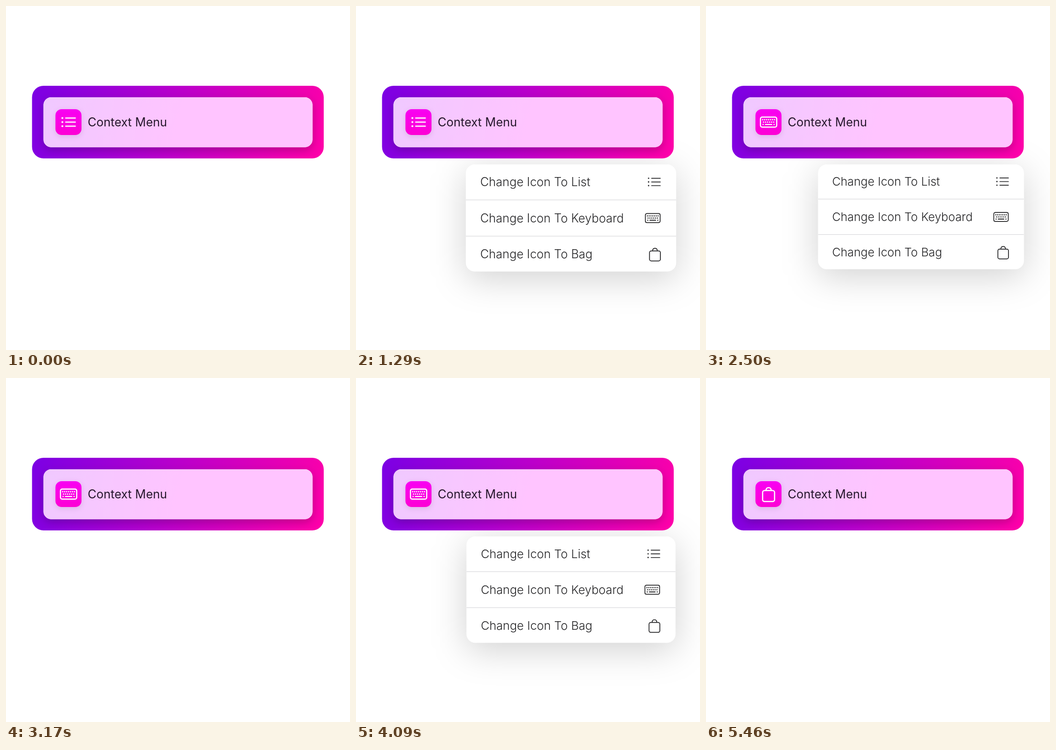
Recreate the animation shown at these times as an HTML page with a canvas. Size 720 by 720 pixels, loop 5960 ms.

```html
<!DOCTYPE html>
<html lang="en">
<head>
<meta charset="utf-8">
<title>Context menu</title>
<style>
  html, body { margin: 0; width: 100%; height: 100%; overflow: hidden; background: #fff; }
  canvas { display: block; width: 100%; height: 100%; }
</style>
</head>
<body>
<canvas id="stage" width="720" height="720"></canvas>
<script>
const ctx = document.getElementById('stage').getContext('2d');
const LOOP = 5960;
const FONT = 'Inter, Roboto, sans-serif';
const INK = '#252527';

// Stretches of motion: start, end, number of steps
const RUNS = [
  [880, 1460, 7], [1580, 2090, 6], [2290, 2880, 7],
  [3670, 4170, 6], [4300, 4880, 7], [5010, 5460, 6]
];

// Each opening of the menu: press time, opacity at the press, closing time
const OPENINGS = [
  { press: 880, dim: 0.3, close: 2510 },
  { press: 3670, dim: 0.18, close: 5110 }
];
const CLOSE_MS = 345;

// Highlighted row: from, to, row
const HIGHLIGHTS = [
  [1580, 1680, 0], [1680, 2290, 1],
  [4390, 4490, 0], [4490, 4780, 1], [4780, 5010, 2]
];

const clamp = v => Math.min(1, Math.max(0, v));

function snap(t) {
  let held = 0;
  for (const [start, end, steps] of RUNS) {
    if (t < start) break;
    const gap = (end - start) / (steps - 1);
    held = Math.min(end, start + Math.floor((t - start) / gap + 1e-6) * gap);
  }
  return held;
}

function box(x, y, w, h, r) {
  ctx.beginPath();
  ctx.roundRect(x, y, w, h, r);
}

function fillBox(x, y, w, h, r, fill, alpha = 1) {
  ctx.save();
  ctx.globalAlpha *= alpha;
  ctx.fillStyle = fill;
  box(x, y, w, h, r);
  ctx.fill();
  ctx.restore();
}

function softBox(x, y, w, h, r, blur, alpha) {
  ctx.save();
  ctx.filter = `blur(${blur}px)`;
  fillBox(x, y, w, h, r, '#000', alpha);
  ctx.restore();
}

function gradient(x0, y0, x1, y1, ...colors) {
  const g = ctx.createLinearGradient(x0, y0, x1, y1);
  colors.forEach((c, i) => g.addColorStop(i / (colors.length - 1), c));
  return g;
}

function label(text, x, y, size, weight, color) {
  ctx.font = `${weight} ${size}px ${FONT}`;
  ctx.fillStyle = color;
  ctx.fillText(text, x, y);
}

function dot(x, y, r) {
  ctx.beginPath();
  ctx.arc(x, y, r, 0, Math.PI * 2);
  ctx.fill();
}

function line(x0, x1, y) {
  ctx.beginPath();
  ctx.moveTo(x0, y);
  ctx.lineTo(x1, y);
  ctx.stroke();
}

function listIcon() {
  for (const y of [-8.5, 0, 8.5]) {
    dot(-13, y, ctx.lineWidth * 0.82);
    line(-6, 14, y);
  }
}

function keyboardIcon() {
  box(-17, -10.5, 34, 21, 3.5);
  ctx.stroke();
  const key = (x, y) => ctx.fillRect(x - 1.2, y - 1.2, 2.4, 2.4);
  for (let i = 0; i < 7; i++) key((i - 3) * 4.1, -5);
  for (let i = 0; i < 6; i++) key((i - 2.5) * 4.3, 0);
  key(-11.5, 5);
  key(11.5, 5);
  ctx.fillRect(-7.5, 3.9, 15, 2.2);
}

function bagIcon() {
  box(-12.5, -7.5, 25, 23, 4);
  ctx.stroke();
  ctx.beginPath();
  ctx.moveTo(-5.5, -8);
  ctx.bezierCurveTo(-5, -15.5, 5, -15.5, 5.5, -8);
  ctx.stroke();
}

const ROWS = [
  { text: 'Change Icon To List', icon: listIcon, x: 620.5, y: 367.5 },
  { text: 'Change Icon To Keyboard', icon: keyboardIcon, x: 617.5, y: 441.5 },
  { text: 'Change Icon To Bag', icon: bagIcon, x: 622, y: 515.5 }
];

function drawIcon(icon, x, y, scale, weight, color) {
  ctx.save();
  ctx.translate(x, y);
  ctx.scale(scale, scale);
  ctx.lineWidth = weight;
  ctx.lineCap = 'round';
  ctx.strokeStyle = ctx.fillStyle = color;
  icon();
  ctx.restore();
}

// Layers fade one by one, so lower ones show through upper ones
function drawCard(alpha, icon) {
  ctx.save();
  ctx.globalAlpha = alpha;
  fillBox(54.5, 167, 610.5, 152, 24, gradient(54, 167, 665, 319, '#7b00e4', '#bd00ca', '#ff00a8'));

  ctx.save();
  box(54.5, 167, 610.5, 152, 24);
  ctx.clip();
  softBox(78.5, 197, 563, 104, 16, 9, 0.23);
  ctx.restore();

  fillBox(78.5, 191, 563, 104.5, 16, '#fff');
  fillBox(78.5, 191, 563, 104.5, 16, gradient(78, 191, 360, 261, '#f0c9ff', '#ffc4ff'), alpha);

  softBox(104, 219, 54, 54, 12, 6, 0.1);
  fillBox(103.5, 216, 54.5, 54, 13, gradient(0, 216, 0, 270, '#f800f2', '#fd00d4'));
  drawIcon(icon, 131, 243, 1, 2.5, '#fff');
  label('Context Menu', 171, 252, 25, 400, '#26182c');
  ctx.restore();
}

function drawMenu(scale, alpha, active) {
  ctx.save();
  ctx.translate(450, 331.5);
  ctx.scale(scale, scale);
  ctx.translate(-450, -331.5);
  ctx.globalAlpha = alpha;
  softBox(234.5, 346, 431, 219.5, 18, 36, 0.18);
  fillBox(234.5, 331.5, 431, 219.5, 18, '#fff');

  ctx.save();
  box(234.5, 331.5, 431, 219.5, 18);
  ctx.clip();
  if (active >= 0) fillBox(234.5, 330 + active * 74.3, 431, 74.3, 0, '#ebebed');
  for (const y of [403.6, 477.8]) fillBox(234.5, y, 431, 1.2, 0, '#dadadd');
  ctx.restore();

  for (const row of ROWS) {
    label(row.text, 264, row.y + 8.7, 24.4, 300, INK);
    drawIcon(row.icon, row.x, row.y, 0.89, 1.9, INK);
  }
  ctx.restore();
}

function draw(time) {
  const t = snap(time);
  let cardAlpha = 1;

  ctx.fillStyle = '#fff';
  ctx.fillRect(0, 0, 720, 720);

  for (const { press, dim, close } of OPENINGS) {
    if (t < press || t >= close + CLOSE_MS) continue;
    cardAlpha = clamp(dim + (t - press) / 240);
    const age = t - press - 100;
    if (age <= 0) continue;
    const out = clamp((t - close) / CLOSE_MS);
    const spring = 1 - Math.exp(-age / 80) * Math.cos(age / 75);
    const row = HIGHLIGHTS.find(([from, to]) => t >= from && t < to);
    drawMenu(spring * (1 - 0.8 * out * out), clamp(age / 130) * (1 - out), row ? row[2] : -1);
  }

  const icon = t < 2380 ? listIcon : t < 5095 ? keyboardIcon : bagIcon;
  drawCard(cardAlpha, icon);
}

const begun = performance.now();
function tick() {
  draw((performance.now() - begun) % LOOP);
  requestAnimationFrame(tick);
}
tick();
</script>
</body>
</html>
```
